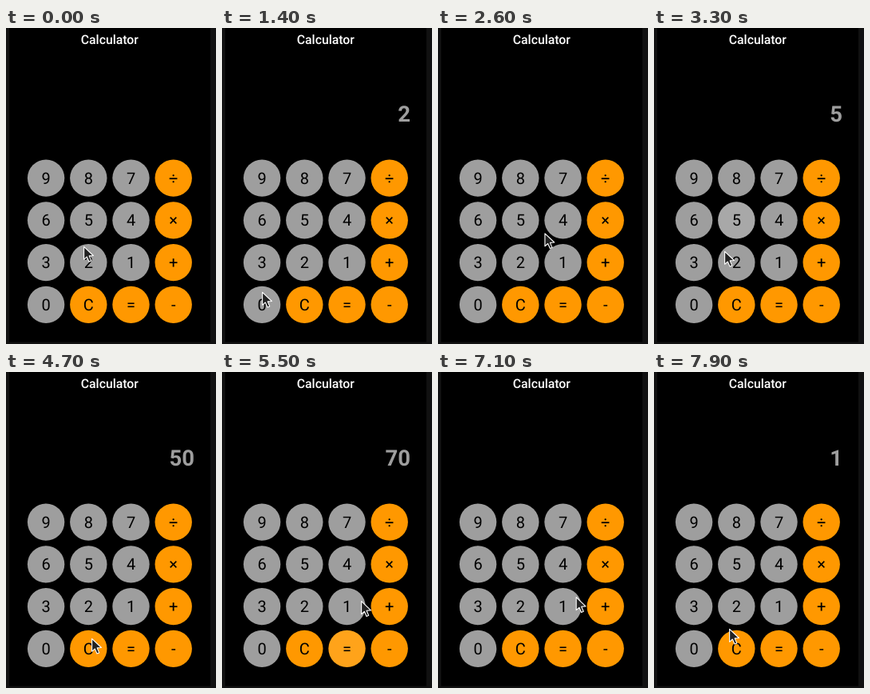
Animation of 263x395 px, one loop 8 s. Source, as an HTML page:

```html
<!DOCTYPE html>
<html lang="en">
<head>
<meta charset="utf-8">
<title>Calculator</title>
<style>
  html, body { margin: 0; width: 100%; height: 100%; overflow: hidden; background: #000; }
  svg { display: block; width: 100vw; height: 100vh; }
  text { font-family: Roboto, sans-serif; text-rendering: geometricPrecision; }
  .title { font-size: 15.8px; font-weight: 500; fill: #fff; text-anchor: middle; }
  .display { font-size: 27.5px; font-weight: 700; fill: #9e9e9e; text-anchor: end; }
  .key { font-size: 20px; fill: #000; text-anchor: middle; }
</style>
</head>
<body>
<svg viewBox="0 0 263 395">
  <rect width="263" height="395" fill="#111"/>
  <rect x="4" width="252" height="392.5"/>
  <text class="title" x="129.8" y="20">Calculator</text>
  <text class="display" id="display" x="236" y="117"></text>
  <g id="keys"></g>
  <path id="cursor" d="M.6 1.3V17.3L4.3 14L7 20.1L9.7 18.9L7.1 12.9L12.4 12.5Z"
        fill="#222" stroke="#fff" stroke-width="1.1" stroke-linejoin="round"/>
</svg>
<script>
const LOOP = 8000, TICK = 100, GLOW = 200;
const $ = id => document.getElementById(id);

function add(tag, attrs, text = '') {
  const el = document.createElementNS('http://www.w3.org/2000/svg', tag);
  for (const name in attrs) el.setAttribute(name, attrs[name]);
  el.textContent = text;
  return $('keys').appendChild(el);
}

const glows = {};
['987÷', '654×', '321+', '0C=-'].forEach((row, r) => [...row].forEach((label, c) => {
  const disc = { cx: 50.1 + c * 53.2, cy: 187.6 + r * 52.75, r: 23.2 };
  add('circle', { ...disc, fill: /\d/.test(label) ? '#9e9e9e' : '#ff9800' });
  glows[label] = add('circle', { ...disc, fill: '#fff', opacity: 0 });
  add('text', { class: 'key', x: disc.cx, y: disc.cy + 7.1 }, label);
}));

const presses = [
  { key: '2', at: 700 }, { key: '0', at: 1600 }, { key: '+', at: 2400 }, { key: '5', at: 3200 },
  { key: '0', at: 4400 }, { key: '=', at: 5400 }, { key: '÷', at: 6600 }, { key: '1', at: 7500 }
];

// Pointer stops: arrival time, x, y; each move starts one tick after the last stop
const stops = [
  [0, 97, 272], [500, 98, 276], [1400, 50, 329], [1800, 145, 316], [2200, 198, 300],
  [2800, 121, 247], [3000, 110, 237], [3300, 88, 278], [3700, 58, 311], [4500, 52, 331],
  [4700, 107, 332], [5200, 149, 337], [5900, 194, 244], [6400, 208, 184],
  [6900, 177, 272], [7300, 169, 287], [7900, 94, 320]
];

const easeOut = k => 1 - (1 - k) ** 2;

function pointer(t) {
  const next = stops.findIndex(s => s[0] > t);
  if (next < 0) return stops.at(-1).slice(1);
  const [left, x0, y0] = stops[next - 1], [arrive, x1, y1] = stops[next];
  const start = left + TICK;
  const k = easeOut(Math.max(0, (t - start) / (arrive - start)));
  return [x0 + (x1 - x0) * k, y0 + (y1 - y0) * k];
}

function shown(t) {
  let value = '', stored = 0;
  for (const { key, at } of presses) {
    if (at > t) break;
    if (key === '=') value = String(stored + Number(value));
    else if (/\d/.test(key)) value += key;
    else { stored = Number(value); value = ''; }
  }
  return value;
}

function draw(time) {
  const t = Math.floor(time % LOOP / TICK) * TICK;
  $('display').textContent = shown(t);
  $('cursor').setAttribute('transform', `translate(${pointer(t)})`);
  for (const label in glows) {
    const lit = presses.find(p => p.key === label && t >= p.at && t < p.at + GLOW);
    glows[label].setAttribute('opacity', lit ? 0.2 * (1 - (t - lit.at) / GLOW) : 0);
  }
}

const begin = performance.now();
function frame() {
  draw(performance.now() - begin);
  requestAnimationFrame(frame);
}
draw(0);
requestAnimationFrame(frame);
</script>
</body>
</html>
```
